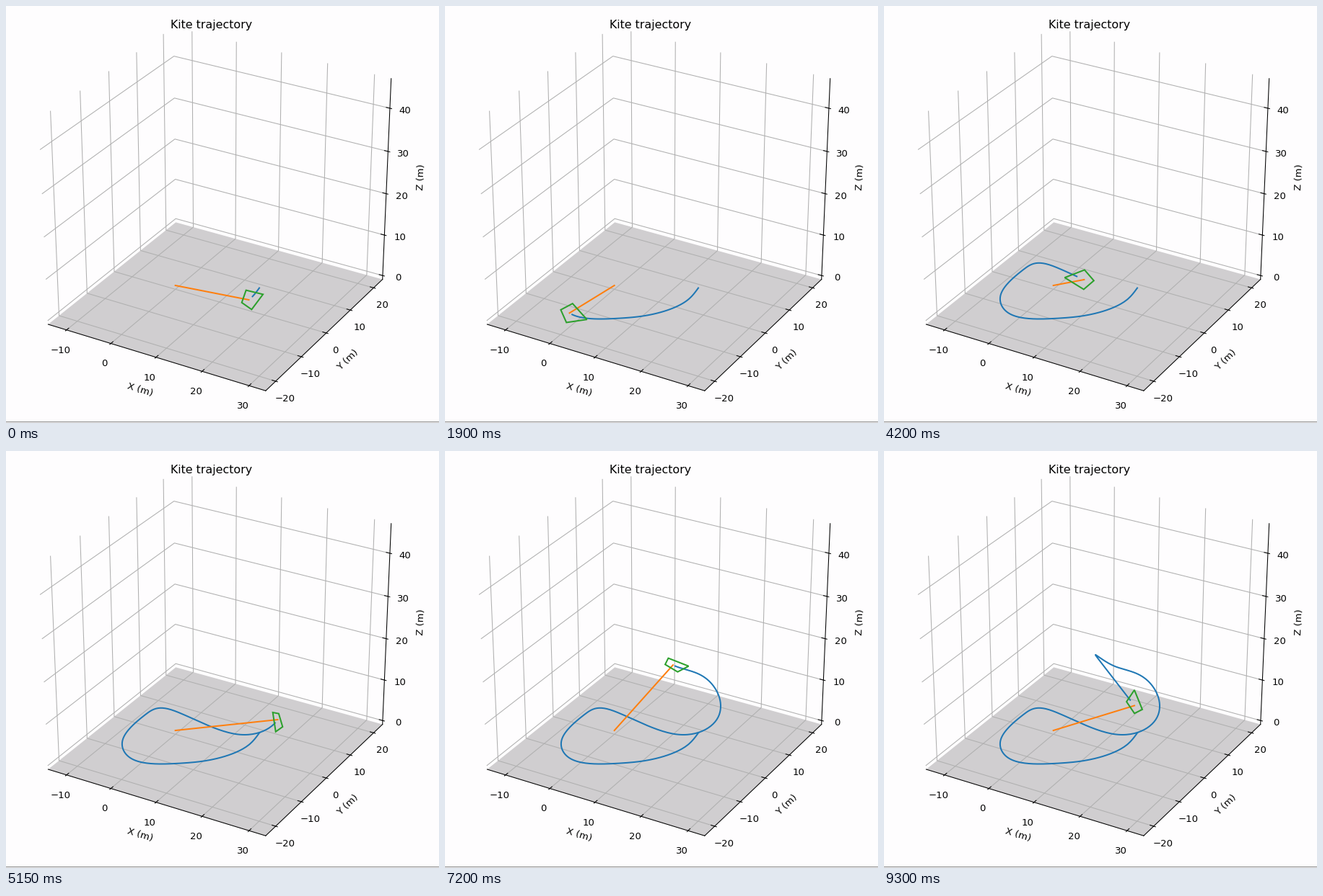
A matplotlib script for the animation above (9350 ms loop, 600 by 579 pixels).

```python
import numpy as np
import matplotlib.pyplot as plt
from matplotlib.animation import FuncAnimation
from matplotlib.patches import Polygon, Rectangle

W, H, DPI = 600, 579, 100
FRAMES, STEP_MS = 187, 50
PAPER, FLOOR, GRID = "#fefdfe", "#d0ced0", "#b0b0b0"
TEXT, TITLE, THIN, THICK = 9.5, 11.4, 0.76, 1.45

plt.rcParams["font.family"] = "DejaVu Sans"

# Box of the 3D axes (metres) and the camera looking at it
SIDE = 47.7
LO = np.array([-14.2, -23.8, -0.95])
HI = LO + SIDE
ELEV, AZIM, DIST = np.radians(30), np.radians(-60), 9.6
CENTER, SCALE, SQUASH = (293.8, 273.0), 347.9, 0.935
RIGHT = np.array([-np.sin(AZIM), np.cos(AZIM), 0])
TOWARD = np.array([np.cos(ELEV) * np.cos(AZIM),
                   np.cos(ELEV) * np.sin(AZIM), np.sin(ELEV)])
UP = np.cross(TOWARD, RIGHT)


def project(points):
    """Metres to stage pixels."""
    p = (np.asarray(points, float) - LO) / SIDE - 0.5
    size = SCALE / (1 - p @ TOWARD / DIST)
    return np.column_stack([CENTER[0] + size * (p @ RIGHT),
                            CENTER[1] - size * SQUASH * (p @ UP)])


def spline(keys):
    """Natural cubic spline through rows of (time, values...)."""
    t, v = np.split(np.array(keys, float), [1], axis=1)
    t = t[:, 0]
    h, rate = np.diff(t), np.diff(v, axis=0) / np.diff(t)[:, None]
    system, rhs = np.eye(len(t)), np.zeros_like(v)
    for k in range(1, len(t) - 1):
        system[k, k - 1:k + 2] = h[k - 1], 2 * (h[k - 1] + h[k]), h[k]
        rhs[k] = 6 * (rate[k] - rate[k - 1])
    bend = np.linalg.solve(system, rhs)

    def at(q):
        q = np.atleast_1d(q)
        k = np.clip(np.searchsorted(t, q, side="right") - 1, 0, len(h) - 1)
        step = h[k][:, None]
        u = (q - t[k])[:, None] / step
        s = 1 - u
        return (s * v[k] + u * v[k + 1]
                + step**2 / 6 * ((s**3 - s) * bend[k] + (u**3 - u) * bend[k + 1]))
    return at


# A few points of the flight on the stage: time step, x, y
path = spline([
    (-5, 351, 391.5), (0, 336.5, 408), (9, 292, 427), (19, 243, 433.5),
    (38, 172.5, 426.3), (50, 162, 400), (64, 192.5, 366.5), (76, 229, 359.3),
    (90, 318, 393), (103, 376.5, 373), (109, 382, 353), (121, 366, 319.5),
    (142, 320, 299), (163, 293, 283), (172, 301, 294), (186, 347, 353.5),
])

# Heading of the nose in the kite's own plane: time step, degrees
heading = spline([(0, 197), (38, 160), (64, 74), (86, -8), (103, 42),
                  (128, 157), (161, 180), (186, 245)])

ANCHOR = project([(0, 0, 0)])[0]
REACH, LIFT = 154, 0.2
NOSE, TAIL, WING = 14, 28, 15
LAG = 1.5


def kite_corners(i, end):
    """Flat kite facing away from the anchor, tilted slightly upward."""
    a, b = (end - ANCHOR) * (1, -1 / SQUASH)
    c = np.sqrt(max(REACH**2 - a * a - b * b, 0))
    normal = np.array([a, b, c]) / REACH + (0, LIFT, 0)
    normal /= np.linalg.norm(normal)
    side = np.cross((0, 1, 0), normal)
    side /= np.linalg.norm(side)
    rise = np.cross(normal, side)
    turn = np.radians(heading(i)[0, 0])
    nose = np.cos(turn) * side + np.sin(turn) * rise
    wing = np.cross(normal, nose)
    shape = np.array([NOSE * nose, WING * wing, -TAIL * nose, -WING * wing])
    return end + shape[:, :2] * (1, -SQUASH)


fig = plt.figure(figsize=(W / DPI, H / DPI), dpi=DPI, facecolor=PAPER)
ax = fig.add_axes([0, 0, 1, 1])
ax.set_xlim(0, W)
ax.set_ylim(H, 0)
ax.axis("off")


def line3d(points, color, z):
    ax.plot(*project(points).T, color=color, lw=THIN, zorder=z)


def label(x, y, text, angle=0):
    ax.text(x, y, text, size=TEXT, ha="center", va="center", rotation=angle)


def tick(pos, outward, value, offset):
    pos, outward = np.array(pos), np.array(outward)
    line3d([pos + 0.38 * outward, pos - 0.76 * outward], "black", 3)
    x, y = project([pos])[0] + offset
    label(x, y, str(value).replace("-", "\u2212"))


(x0, y0, z0), (x1, y1, z1) = LO, HI
left, front, right, back = (x0, y0, z0), (x1, y0, z0), (x1, y1, z0), (x0, y1, z0)
ax.add_patch(Polygon(project([left, front, right, back]),
                     facecolor=FLOOR, edgecolor="none", zorder=0))

for v in range(-10, 31, 10):
    line3d([(v, y0, z0), (v, y1, z0), (v, y1, z1)], GRID, 1)
    tick((v, y0, z0), (0, -1, 0), v, (-8.7, 28.3))
for v in range(-20, 21, 10):
    line3d([(x1, v, z0), (x0, v, z0), (x0, v, z1)], GRID, 1)
    tick((x1, v, z0), (1, 0, 0), v, (12.5, 24.3))
for v in range(0, 41, 10):
    line3d([(x0, y0, v), (x0, y1, v), (x1, y1, v)], GRID, 1)
    tick((x1, y1, v), (1, 0, 0), v, (21.3, 3.6))

for edge in [(left, front), (front, right), (right, (x1, y1, z1))]:
    line3d(edge, "black", 2)

label(186, 533, "X (m)", -17.1)
label(474, 491.5, "Y (m)", 43.9)
label(575, 238, "Z (m)", 87.7)
ax.text(284.7, 31, "Kite trajectory", size=TITLE, ha="center", va="baseline")
ax.add_patch(Rectangle((0, 577), W, 1.2, facecolor="#808080", lw=0, zorder=4))

trail, = ax.plot([], [], color="C0", lw=THICK, zorder=5)
tether, = ax.plot([], [], color="C1", lw=THICK, zorder=6)
kite = Polygon(np.zeros((4, 2)), fill=False, edgecolor="C2", lw=THICK, zorder=7)
ax.add_patch(kite)


def draw(i):
    end = path(i)[0]
    past = np.append(np.arange(-5, i - LAG, 0.5), i - LAG)
    trail.set_data(*path(past).T)
    tether.set_data(*np.array([ANCHOR, end]).T)
    kite.set_xy(kite_corners(i, end))
    return trail, tether, kite


anim = FuncAnimation(fig, draw, frames=FRAMES, interval=STEP_MS,
                     init_func=lambda: draw(0), repeat=True, repeat_delay=0)
plt.show()
```
